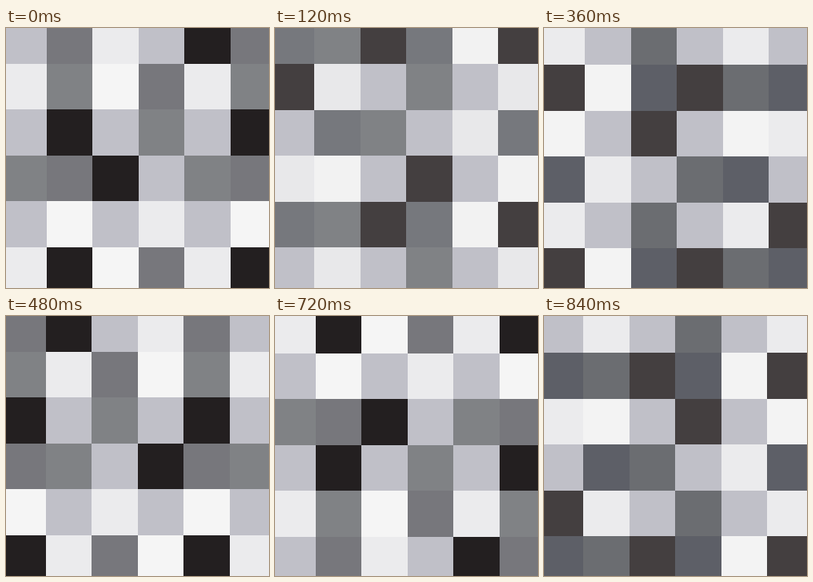
An HTML page with a canvas for the animation above (0.96 s loop, 329 by 326 pixels).

```html
<!DOCTYPE html>
<html lang="en">
<head>
<meta charset="utf-8">
<style>
  html, body { margin: 0; width: 100%; height: 100%; overflow: hidden; }
  canvas { display: block; }
</style>
</head>
<body>
<canvas width="329" height="326"></canvas>
<script>
const ctx = document.querySelector("canvas").getContext("2d");
const SIZE = 6, CELL = 57.5, STEP_MS = 120;

const tiles = ["LDWLKD", "WGXDWG", "LKLGLK", "GDKLGD", "LXLWLX", "WKXDWK"];
const mirrored = tiles.map(row => [...row].reverse().join(""));

const upright  = { K: "#231f20", D: "#77777c", G: "#808285", L: "#c0c0c8", W: "#ebebed", X: "#f5f5f5" };
const sideways = { K: "#443f40", D: "#76787d", G: "#808285", L: "#c0c0c8", W: "#e8e8ea", X: "#f2f2f2" };
const deep     = { K: "#443f40", D: "#5d5f67", G: "#6b6d71", L: "#c0c0c8", W: "#ebebed", X: "#f3f3f3" };

// Quarter turns are counterclockwise; x, y is the centre of the pattern.
const poses = [
  { grid: tiles,    turns: 0, x: 166,   y: 160,   colors: upright },
  { grid: tiles,    turns: 1, x: 164.5, y: 160.5, colors: sideways },
  { grid: tiles,    turns: 2, x: 164.5, y: 162,   colors: upright },
  { grid: tiles,    turns: 3, x: 166.5, y: 161.5, colors: deep },
  { grid: mirrored, turns: 0, x: 165,   y: 160,   colors: upright },
  { grid: mirrored, turns: 3, x: 166.5, y: 160.5, colors: sideways },
  { grid: mirrored, turns: 2, x: 166,   y: 162,   colors: upright },
  { grid: mirrored, turns: 1, x: 164.5, y: 161.5, colors: deep },
];

function tileAt(grid, row, col, turns) {
  for (let i = 0; i < turns; i++) [row, col] = [col, SIZE - 1 - row];
  return grid[row][col];
}

function edge(centre, index) {
  return Math.floor(centre + (index - SIZE / 2) * CELL);
}

function draw({ grid, turns, x, y, colors }) {
  for (let row = 0; row < SIZE; row++) {
    for (let col = 0; col < SIZE; col++) {
      const left = edge(x, col), top = edge(y, row);
      ctx.fillStyle = colors[tileAt(grid, row, col, turns)];
      ctx.fillRect(left, top, edge(x, col + 1) - left, edge(y, row + 1) - top);
    }
  }
}

function frame() {
  draw(poses[Math.floor(performance.now() / STEP_MS) % poses.length]);
  requestAnimationFrame(frame);
}
frame();
</script>
</body>
</html>
```
